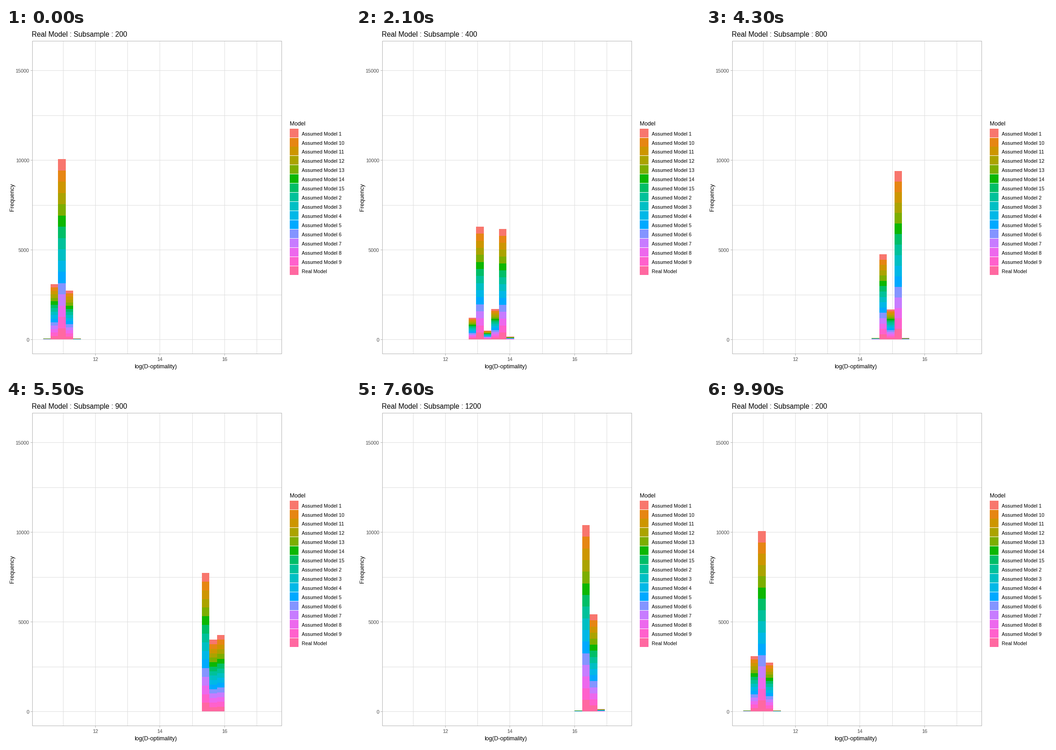
Animation of 748x748 px, one loop 10 s. Source, as a matplotlib script:

```python
import math

import numpy as np
import matplotlib.pyplot as plt
from matplotlib.animation import FuncAnimation
from matplotlib.collections import PolyCollection
from matplotlib.patches import Rectangle

SIZE, DPI = 748, 100
PX = 72 / DPI
plt.rcParams["font.family"] = "Liberation Sans"

COLORS = ["#F8766D", "#E68613", "#CD9600", "#ABA300", "#7CAE00", "#0CB702",
          "#00BE67", "#00C19A", "#00BFC4", "#00B8E7", "#00A9FF", "#8494FF",
          "#C77CFF", "#ED68ED", "#FF61CC", "#FF68A1"]
MODELS = [f"Assumed Model {i}" for i in [1, *range(10, 16), *range(2, 10)]]
MODELS.append("Real Model")

SAMPLES = range(200, 1501, 100)
BINS, TOTAL = 29, 16000

# Frames spent on each move; every state rests for four more frames
STEPS = [4] * 3 + [3] * 3 + [2] + [3] * 7
REST = 4
FRAMES = sum(STEPS) + REST * len(STEPS)

LEFT, RIGHT, TOP, BOTTOM = 57, 599, 28, 708
BASE, Y_SCALE = 677.8, 0.039
EDGES = np.floor(81.02 + 16.45 * np.arange(BINS + 1))


def histogram(n):
    """Bin counts of a normal whose mean grows and spread shrinks with n."""
    mean = 1.975 + 12.88 * math.log(n / 200)
    sd = 0.559 * (200 / n) ** 0.52
    z = (np.arange(BINS + 1) - 0.5 - mean) / (sd * math.sqrt(2))
    return TOTAL / 2 * np.diff([math.erf(v) for v in z])


COUNTS = [histogram(n) for n in SAMPLES]

fig = plt.figure(figsize=(SIZE / DPI, SIZE / DPI), dpi=DPI, facecolor="white")
ax = fig.add_axes([0, 0, 1, 1])
ax.set_xlim(0, SIZE)
ax.set_ylim(SIZE, 0)
ax.axis("off")


def label(x, y, s, size, color="black", ha="left", rotation=0):
    return ax.text(x, y, s, fontsize=size * PX, color=color, ha=ha,
                   va="baseline", rotation=rotation, rotation_mode="anchor")


def line(xs, ys, color):
    # A small offset keeps pixel snapping unambiguous
    ax.plot(np.add(xs, 0.1), np.add(ys, 0.1), color=color, lw=PX,
            solid_capstyle="butt", zorder=1)


def draw_panel():
    for k in range(7):
        x = math.floor(124.1 + 70.25 * k)
        y = math.floor(BASE - 2500 * k * Y_SCALE)
        line([x, x], [TOP, BOTTOM], "#dedede")
        line([LEFT, RIGHT], [y, y], "#dedede")
        if k % 2:
            line([x, x], [BOTTOM, BOTTOM + 4], "#b3b3b3")
            label(x, 724, str(11 + k), 10.8, "#4d4d4d", "center")
        else:
            line([LEFT - 4, LEFT], [y, y], "#b3b3b3")
            label(50.3, y + 4.8, str(2500 * k), 10.8, "#4d4d4d", "right")
    ax.add_patch(Rectangle((LEFT + 0.1, TOP + 0.1), RIGHT - LEFT, BOTTOM - TOP,
                           fill=False, ec="#b3b3b3", lw=PX, zorder=4))
    label(325.5, 740, "log(D-optimality)", 12.6, ha="center")
    label(17, 367.5, "Frequency", 12.7, ha="center", rotation=90)


def draw_legend():
    label(617, 211.5, "Model", 12.5)
    for i, (name, color) in enumerate(zip(MODELS, COLORS)):
        top = math.floor(219.1 + 19.93 * i)
        ax.add_patch(Rectangle((617, top), 19, 19, fc=color, lw=0))
        label(643, top + 15, name, 10.75)


def bar_parts(counts):
    verts, colors = [], []
    layers = np.arange(len(COLORS), -1, -1) / len(COLORS)
    for x0, x1, count in zip(EDGES, EDGES[1:], counts):
        ys = np.floor(BASE - Y_SCALE * count * layers)
        for y0, y1, color in zip(ys, ys[1:], COLORS):
            if y1 > y0:
                verts.append([(x0, y0), (x1, y0), (x1, y1), (x0, y1)])
                colors.append(color)
    return verts, colors


def state_at(frame):
    """Return the current state, the next one and the progress between."""
    start = 0
    for i, steps in enumerate(STEPS):
        start += REST
        if frame < start + steps:
            t = max(0, frame - start + 1) / steps
            return i, (i + 1) % len(SAMPLES), t
        start += steps


draw_panel()
draw_legend()
title = label(56, 19, "", 15.5)
bars = PolyCollection([], linewidths=0, antialiaseds=False, zorder=3)
ax.add_collection(bars, autolim=False)


def update(frame):
    a, b, t = state_at(frame)
    verts, colors = bar_parts((1 - t) * COUNTS[a] + t * COUNTS[b])
    bars.set_verts(verts)
    bars.set_facecolor(colors)
    title.set_text(f"Real Model : Subsample : {SAMPLES[a if t <= 0.5 else b]}")
    return bars, title


anim = FuncAnimation(fig, update, frames=FRAMES, interval=100,
                     repeat=True, repeat_delay=0, blit=False)
plt.show()
```
